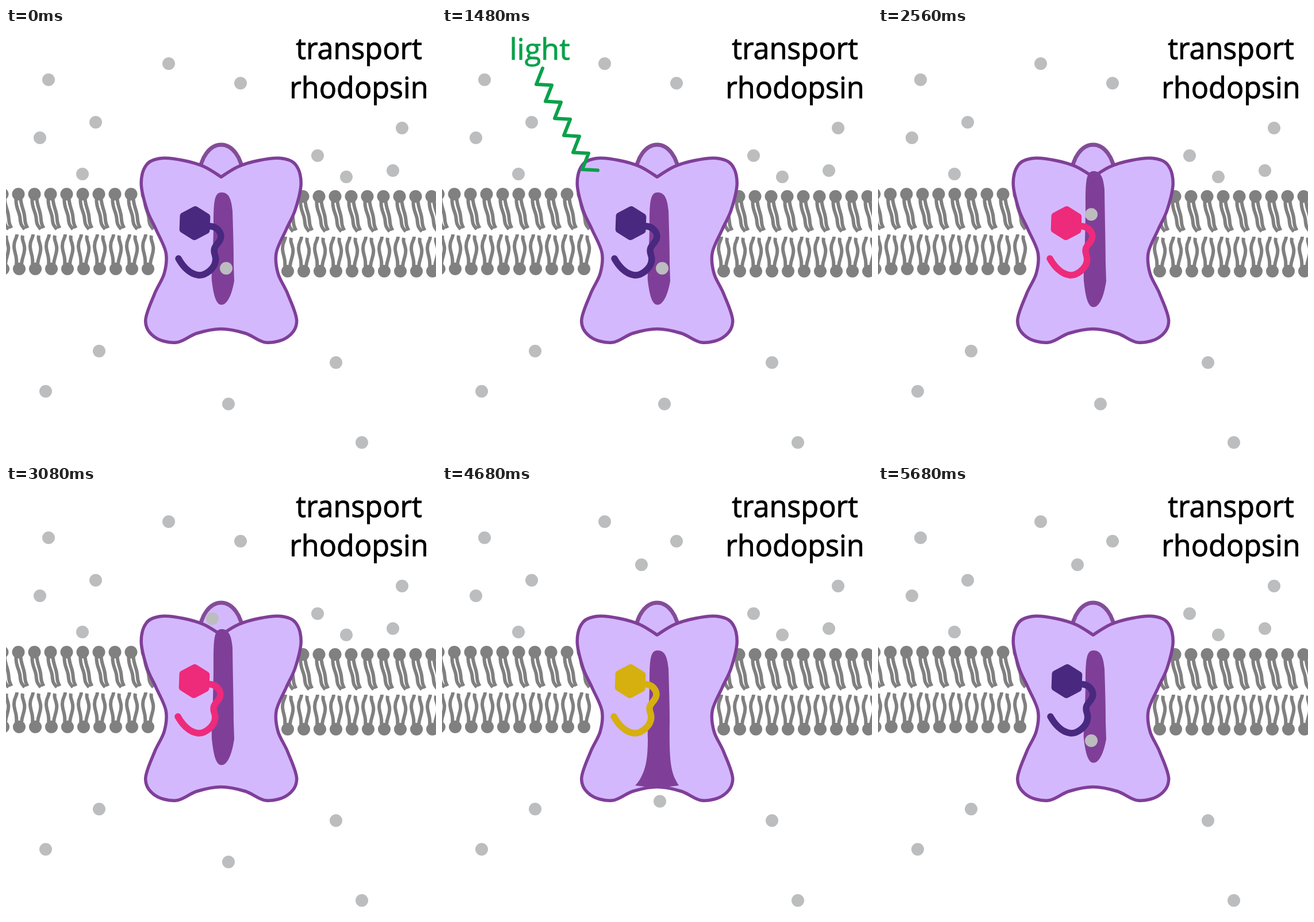
Recreate the animation shown at these times as an HTML page. Size 748x748 px, loop 6960 ms.

```html
<!DOCTYPE html>
<html lang="en">
<head>
<meta charset="utf-8">
<title>Transport rhodopsin</title>
<style>
html, body { margin: 0; width: 100%; height: 100%; overflow: hidden; background: #fff; }
svg { display: block; width: 100vw; height: 100vh; }
text { font: 50.3px "Open Sans", "Noto Sans", sans-serif; text-anchor: middle; stroke: #000; stroke-width: .9; }
#light text { font-size: 52px; fill: #0aa14b; stroke: #0aa14b; }
.line { fill: none; stroke-linecap: round; stroke-linejoin: round; }
</style>
</head>
<body>
<svg viewBox="0 0 748 748">
  <defs>
    <g id="upper">
      <circle r="11" fill="#808080" stroke="none"/>
      <path d="M-4 8C-5 24 2 30 3 42S6 55 11 61M4 8C5 22 10 28 11 40S13 53 16 59"/>
    </g>
    <g id="lower">
      <circle r="11" fill="#808080" stroke="none"/>
      <path d="M-5-8C-3-22-9-28-9-40S-4-52-4-60M4-8C5-22 11-28 9-39S4-51 6-58"/>
    </g>
  </defs>
  <g id="membrane" fill="none" stroke="#808080" stroke-width="6"></g>
  <g fill="#d4b8fd" stroke="#7f3f98" stroke-width="5.5" transform="translate(-.8 0)">
    <path d="M337 262C337 222 358 203 375 203S413 222 413 262" stroke="#834c98" stroke-width="7"/>
    <path id="body"/>
  </g>
  <path id="pore" fill="#7f3f98"/>
  <g id="retinal">
    <path id="ring" stroke-width="13" stroke-linejoin="round"/>
    <path class="line" d="M350 345C366 343 377 356 373 367C370 376 362 378 362 387S367 397 364 408S347 431 335 430C318 428 306 412 300 401" stroke-width="11.5"/>
  </g>
  <g id="ions" fill="#bcbdbe"></g>
  <g id="light">
    <text x="170" y="54.5">light</text>
    <path id="ray" class="line" stroke="#0aa14b" stroke-width="6"/>
  </g>
  <text x="614" y="54">transport</text>
  <text x="614" y="121.5">rhodopsin</text>
</svg>
<script>
const LOOP = 6960, STEP = 40;
const $ = id => document.getElementById(id);
const set = (el, attrs) => Object.entries(attrs).forEach(([k, v]) => el.setAttribute(k, v));

function add(parent, tag, attrs) {
  const el = document.createElementNS("http://www.w3.org/2000/svg", tag);
  set(el, attrs);
  return $(parent).appendChild(el);
}

// Two stretches of membrane, lipids 28 px apart
function bilayer(x, y, count) {
  for (let i = 0; i < count; i++) {
    add("membrane", "use", { href: "#upper", x: x + 28 * i, y });
    add("membrane", "use", { href: "#lower", x: x + 28 * i + 1.5, y: y + 130 });
  }
}
bilayer(-6.5, 289, 10);
bilayer(488.5, 293, 10);

// Smooth curve through points
function smooth(pts) {
  const at = i => pts[Math.max(0, Math.min(pts.length - 1, i))];
  const handle = (i, s) => [0, 1].map(k => at(i)[k] + s * (at(i + 1)[k] - at(i - 1)[k]) / 6);
  let d = "M" + pts[0];
  for (let i = 1; i < pts.length; i++) d += `C${handle(i - 1, 1)} ${handle(i, -1)} ${at(i)}`;
  return d;
}

// Left side of the protein, mirrored for the right
const side = [
  [375, 259], [345, 241], [310, 230.5], [272, 226.5], [246, 237], [236, 270], [246, 316], [262, 351],
  [279, 391], [276, 427], [259, 463], [243.5, 510], [260, 538], [297, 547], [333, 531], [375, 523.5]
];
const mirrored = side.slice(0, -1).reverse().map(([x, y]) => [750 - x, y]);
set($("body"), { d: smooth([...side, ...mirrored]) + "Z" });

const corner = (_, i) => {
  const a = (i * 60 - 88) * Math.PI / 180;
  return [328.5 + 23 * Math.cos(a), 339.5 + 23 * Math.sin(a)];
};
set($("ring"), { d: "M" + Array.from({ length: 6 }, corner).join("L") + "Z" });

// Channel between two heights; an open bottom flares out
function pore(top, bottom, flared) {
  const end = flared
    ? `C395 480 398 500 412 ${bottom}Q375 ${bottom + 6} 336 ${bottom}C356 500 358 470 358 440`
    : `L397 440C393 ${bottom - 18} 385 ${bottom} 375 ${bottom}S361 ${bottom - 18} 358 440`;
  return `M375 ${top}C388 ${top} 392 ${top + 12} 394 ${top + 32}C395 350 396 380 396 410${end}` +
    `C357 425 361 380 361 ${top + 54}C361 ${top + 14} 363 ${top} 375 ${top}Z`;
}

const rest = { from: 0, d: pore(286, 481.5), color: "#49287f", dx: 0 };
const states = [
  rest,
  { from: 2040, d: pore(249, 485.5), color: "#ee2a7b", dx: -1 },
  { from: 3640, d: pore(286, 521, true), color: "#d5b00f", dx: -1 },
  { ...rest, from: 5680 }
];

const moves = [
  { t0: 2040, t1: 3600, from: [383, 418], to: [347, 137] },
  { t0: 4360, t1: 5000, from: [387, 654], to: [371, 443] }
];

const ion = (cx, cy) => add("ions", "circle", { cx, cy, r: 11 });
[[74, 90], [283, 62], [408, 96], [156, 164], [59, 191], [133, 254], [542, 222], [592, 259],
 [673, 248], [689, 174], [162, 562], [69, 632], [574, 582], [619, 721]].forEach(p => ion(...p));
const movers = moves.map(() => ion(0, 0));

// Zigzag that gains one stroke per step
function zigzag(count) {
  let d = "M175 70";
  for (let i = 0; i < count; i++) d += i % 2 ? "l27 1.6" : "l-11 28";
  return d;
}

function draw(time) {
  const t = Math.floor(time % LOOP / STEP) * STEP;
  const { d, color, dx } = states.filter(s => s.from <= t).pop();
  set($("pore"), { d });
  set($("retinal"), { fill: color, stroke: color, transform: `translate(${dx} 0)` });

  const lit = t >= 1040 && t < 2040;
  set($("light"), { visibility: lit ? "visible" : "hidden" });
  if (lit) set($("ray"), { d: zigzag(Math.min(16, (t - 1040) / STEP + 1)) });

  moves.forEach(({ t0, t1, from, to }, i) => {
    const k = Math.max(0, Math.min(1, (t - t0) / (t1 - t0)));
    const [cx, cy] = from.map((v, j) => v + (to[j] - v) * k);
    set(movers[i], { cx, cy });
  });
}

const start = performance.now();
function tick() {
  draw(performance.now() - start);
  requestAnimationFrame(tick);
}
tick();
</script>
</body>
</html>
```
